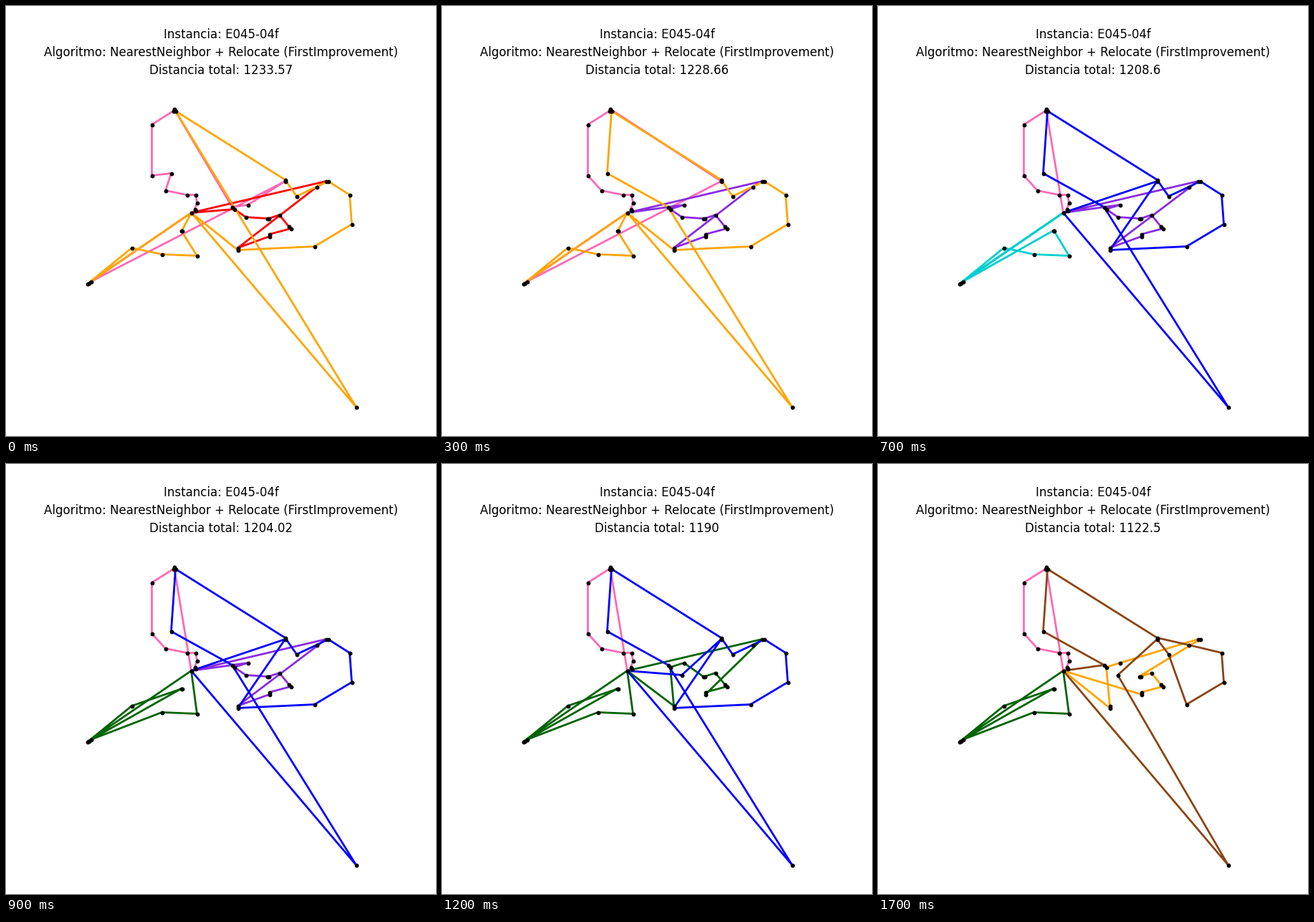
These frames come from a looping animation (600x600 px, 1.8 s). A matplotlib script:

```python
import matplotlib.pyplot as plt
from matplotlib.animation import FuncAnimation

DEPOT = (258, 288)

# Customer positions in pixels, y downwards
NODES = {
    "i": (264, 285), "I": (263, 283), "H": (266, 274), "G": (264, 263),
    "F": (252, 263), "E": (222, 257), "D": (230, 233), "C": (203, 236),
    "B": (203, 165), "p": (233, 146), "q": (234, 143), "t": (236, 146),
    "J": (315, 280), "K": (318, 283), "L": (337, 277), "M": (334, 294),
    "n": (364, 296), "N": (366, 296), "O": (381, 291), "P": (394, 307),
    "Q": (397, 310), "R": (367, 318), "S": (367, 321), "T": (323, 337),
    "U": (323, 340), "V": (389, 242), "W": (389, 244), "X": (405, 265),
    "Y": (433, 252), "Z": (446, 244), "a": (449, 244), "b": (479, 263),
    "c": (482, 304), "d": (430, 335), "e": (488, 559), "f": (245, 313),
    "o": (244, 313), "g": (266, 348), "h": (217, 346), "x": (175, 337),
    "j": (118, 384), "k": (115, 386), "l": (113, 387),
}

# A route takes its colour from its first customer
COLORS = {
    "i": "hotpink", "f": "orange", "U": "orange", "K": "red",
    "L": "blueviolet", "W": "blue", "M": "blue", "j": "darkturquoise",
    "g": "darkgreen", "T": "darkgreen", "e": "saddlebrown",
}

START = ["iIHGFEDCBpqJLWj", "foghxkl", "KMnNOPQRSTYZ", "UdcbaXVte"]

# (customer, new route, customer it is placed before)
MOVES = [
    ("D", 3, "e"), ("J", 3, "e"), ("L", 2, "K"), ("W", 3, "U"),
    ("j", 1, "f"), ("Y", 3, "X"), ("f", 1, "g"), ("g", 1, "j"),
    ("h", 1, "j"), ("L", 2, "M"), ("T", 2, "K"), ("M", 3, "W"),
    ("U", 2, "T"), ("Z", 2, "n"), ("X", 3, "d"), ("e", 3, "M"),
    ("a", 2, "n"),
]

TOTALS = [
    1233.57, 1231.7, 1230.67, 1228.66, 1210.74, 1209.08, 1209.04, 1208.6,
    1207.51, 1204.02, 1195.89, 1190.15, 1190, 1147.36, 1142.05, 1137.32,
    1122.71, 1122.5,
]


def relocate(routes, node, target, before):
    routes = [r.replace(node, "") for r in routes]
    routes[target] = routes[target].replace(before, node + before)
    return routes


history = [START]
for step in MOVES:
    history.append(relocate(history[-1], *step))

fig = plt.figure(figsize=(6, 6), dpi=100, facecolor="white")
ax = fig.add_axes([0, 0, 1, 1])
ax.set_xlim(0, 600)
ax.set_ylim(600, 0)
ax.axis("off")


def title(y, text=""):
    return ax.text(300, y, text, ha="center", va="baseline",
                   fontsize=12, family="DejaVu Sans", color="black")


title(45, "Instancia: E045-04f")
title(70, "Algoritmo: NearestNeighbor + Relocate (FirstImprovement)")
total = title(95)

lines = [ax.plot([], [], lw=2, zorder=1 + k / 10, solid_joinstyle="round")[0]
         for k in range(len(START))]
dots = [DEPOT, *NODES.values()]
ax.plot([x + 0.5 for x, _ in dots], [y + 0.5 for _, y in dots], "o",
        color="black", ms=3.2, mew=1, zorder=3)


def draw(k):
    for line, route in zip(lines, history[k]):
        path = [DEPOT, *(NODES[n] for n in route), DEPOT]
        line.set_data([x + 0.5 for x, _ in path], [y + 0.5 for _, y in path])
        line.set_color(COLORS[route[0]])
    total.set_text(f"Distancia total: {TOTALS[k]:.6g}")
    return [*lines, total]


anim = FuncAnimation(fig, draw, frames=len(history), interval=100,
                     repeat=True, repeat_delay=0)
plt.show()
```
